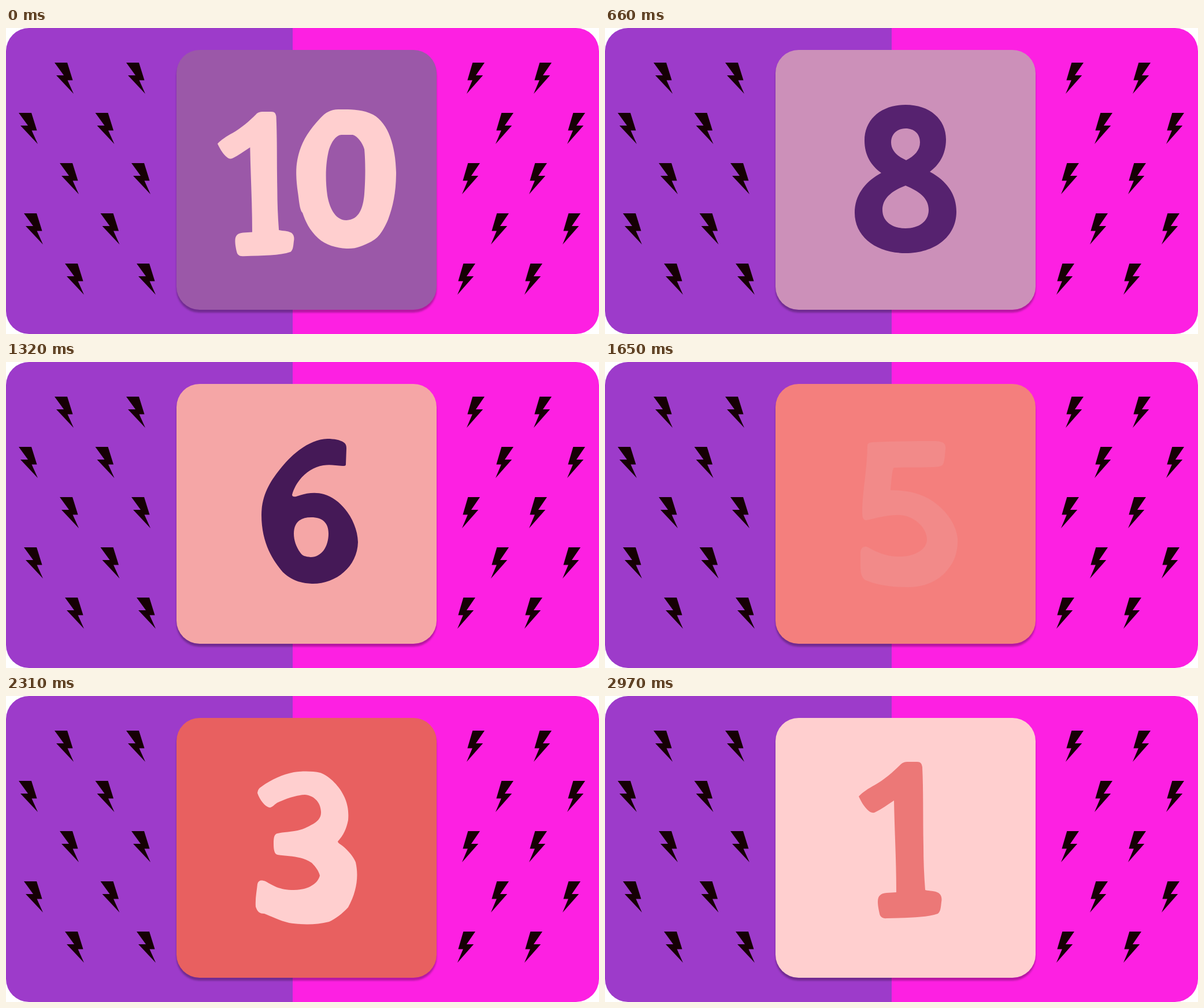
Write an HTML page that moves like this. It is 1026x530 px and loops after 3300 ms.

```html
<!DOCTYPE html>
<html lang="en">
<head>
<meta charset="utf-8">
<title>Countdown</title>
<style>
  html, body { margin: 0; width: 100%; height: 100%; overflow: hidden; background: #fff; }
  svg { display: block; width: 1026px; height: 530px; }
  #card { filter: drop-shadow(0 5px 1.5px rgba(0, 0, 0, .28)); }
  #digits > g { display: none; fill-rule: evenodd; }
  #digits > g.on { display: inline; }
</style>
</head>
<body>
<svg viewBox="0 0 1026 530">
  <defs>
    <clipPath id="stage"><rect width="1026" height="530" rx="40"/></clipPath>
    <path id="bolt" d="M0 0H22L31.5 30.5H22.5L33 54L3 22H16Z"/>
    <path id="one" d="M439 174C445 167 456 160 467 154C483 145 499 131 511 119C515 115 519 114 524 114L540 114C546 114 548 117 549 123C551 165 550 215 551 260C551 285 552 310 554 336C562 338 570 337 577 341C583 345 583 352 582 357C581 365 581 373 576 377C555 384 525 384 488 385C480 386 476 382 475 377C473 368 472 362 472 356C472 346 477 342 487 341L504 340C504 285 501 235 500 181C488 189 478 196 468 201C463 204 458 201 454 197C447 190 443 182 439 174Z"/>
  </defs>
  <g clip-path="url(#stage)">
    <path fill="#9d3bca" d="M0 0H496V530H0Z"/>
    <path fill="#fd20e2" d="M496 0H1026V530H496Z"/>
  </g>
  <g id="bolts" fill="#160004"></g>
  <rect id="card" x="295" y="38" width="450" height="450" rx="40"/>
  <g id="digits">
    <g data-card="#9b58a8" fill="#ffcfcf">
      <use href="#one" transform="translate(-39.2 39.8) scale(.923)"/>
      <path d="M543 157C553 146 562 141 575 141C595 141 615 140 635 150C662 165 674 205 675 250C675 283 670 308 661 332C651 355 643 364 632 370C617 377 606 383 589 382C572 381 553 376 540 364C525 350 518 335 513 320C508 316 507 298 505 285C502 265 501 245 504 229C509 202 520 182 543 157ZM580 185L600 185C608 187 617 199 620 210C622 230 622 262 620 287C618 312 611 332 589 333C568 333 559 308 556 290C552 262 553 232 559 210C563 198 570 186 580 185Z"/>
    </g>
    <g data-card="#56226f" fill="#cc90b9">
      <path d="M521 133C545 133 573 148 589 172C602 194 609 225 609 271C608 305 598 338 575 361C562 373 548 378 537 384C525 389 500 389 486 390C468 389 456 388 451 381C446 372 446 358 445 349C445 341 452 338 458 338C470 341 480 347 498 346C520 346 542 323 555 299C554 297 545 303 535 307C524 312 513 311 500 309C475 305 450 293 438 273C430 260 427 243 428 229C429 175 475 134 521 133ZM516 188C538 188 549 210 548 230C547 243 542 250 531 255C520 261 510 263 500 261C486 257 481 246 481 233C482 210 498 189 516 188Z"/>
    </g>
    <g data-card="#cc90b9" fill="#56226f">
      <path d="M520 133C562 133 590 158 590 193C590 220 577 238 562 249C588 263 608 285 608 318C608 362 570 390 520 390C470 390 432 362 432 320C432 288 452 265 478 251C460 238 449 220 449 195C449 158 478 133 520 133ZM520 174C505 174 495 184 495 198C495 214 508 223 521 229C535 222 545 212 545 198C545 183 535 174 520 174ZM520 273C498 281 480 294 480 315C480 335 497 347 520 347C543 347 560 335 560 315C560 294 542 282 520 273Z"/>
    </g>
    <g data-card="#e86060" fill="#cc90b9">
      <path d="M442 165C442 150 445 146 452 145C475 141 545 145 600 146C608 147 610 147 611 152C612 170 611 180 606 192C590 231 566 278 546 325C540 333 542 342 537 351C531 366 527 377 521 385C518 390 508 390 499 389C485 386 478 380 480 371C481 362 487 356 489 346C509 300 532 247 553 194C515 192 480 191 448 188C443 187 442 187 442 183Z"/>
    </g>
    <g data-card="#f5a6a6" fill="#451957">
      <path d="M589 150L588 177C588 180 586 180 582 180C570 179 560 177 549 179C523 183 502 205 495 230C495 234 500 234 505 232C520 227 535 225 550 229C580 237 608 275 609 312C608 355 570 385 529 384C509 383 494 378 479 364C463 345 442 315 442 265C442 230 458 205 477 182C500 154 528 134 556 133C568 133 578 135 584 139C589 142 589 147 589 150ZM528 269C548 269 558 279 558 297C558 320 546 338 527 338C518 337 513 336 509 330C502 320 498 309 498 297C498 279 508 269 528 269Z"/>
    </g>
    <g data-card="#f47f7d" fill="#f28a89">
      <path d="M454 146C454 141 456 140 462 139C500 137 540 137 573 137C587 138 590 142 589 152C588 160 588 170 585 177C583 181 575 182 565 182C545 183 520 182 500 183C497 185 496 200 494 222C520 222 545 226 567 241C590 257 607 280 610 305C611 325 606 344 594 358C581 376 557 390 525 390C498 390 470 387 449 377C442 370 442 360 442 350L442 329C443 321 449 318 455 321C470 329 485 337 510 337C535 337 558 325 557 306C556 285 533 266 510 265C490 264 470 270 452 274C446 274 445 268 445 258C446 220 453 190 454 146Z"/>
    </g>
    <g data-card="#9b58a8" fill="#ffcfcf">
      <path d="M545 135L568 135C578 136 580 140 580 148L580 290C592 290 603 289 608 293C612 300 611 318 608 328C604 334 592 333 580 333L580 376C579 386 574 388 564 389L545 389C535 388 533 384 533 376L533 334L442 334C432 333 429 329 429 320C429 309 429 303 434 294C465 240 495 190 527 144C532 137 537 135 545 135ZM533 208L483 291L533 291Z"/>
    </g>
    <g data-card="#e86060" fill="#ffcfcf">
      <path d="M435 168C436 163 437 160 442 157C460 144 478 136 498 132C513 130 530 130 544 133C560 139 578 157 586 176C592 190 593 202 592 215C589 230 584 241 574 252C575 256 580 257 584 261C593 269 601 278 605 288C610 310 608 337 592 366C582 377 570 386 559 391C535 397 510 396 490 393C473 389 458 381 447 377C439 377 435 374 432 365C431 350 434 337 435 326C437 318 443 319 449 321C462 328 472 336 498 336C520 336 539 327 543 311C541 303 536 296 529 289C512 277 490 278 470 275C464 274 463 265 463 256C463 245 464 239 470 238C480 235 500 236 517 229C532 222 546 216 545 200C544 182 531 172 517 171C498 172 480 180 469 185C463 189 460 194 455 193C448 191 439 180 435 168Z"/>
    </g>
    <g data-card="#f47f7d" fill="#56226f">
      <path d="M438 172C455 145 485 132 520 132C565 132 596 160 596 200C596 250 550 300 506 342L595 340C606 340 609 346 609 355L608 375C607 385 602 388 592 388L450 389C438 389 434 384 434 374C434 362 436 352 445 343C490 300 545 245 545 205C545 185 535 175 517 175C495 175 482 185 471 197C466 203 461 203 455 198C446 190 440 182 438 172Z"/>
    </g>
    <g data-card="#ffcfcf" fill="#ec7877"><use href="#one"/></g>
  </g>
</svg>
<script>
  const STEP = 330;
  const card = document.getElementById('card');
  const digits = [...document.getElementById('digits').children];

  const bolt = (x, y, scale) =>
    `<use href="#bolt" transform="translate(${x} ${y}) scale(${scale} 1)"/>`;

  // Five staggered rows of bolts, mirrored on the right half
  let bolts = '';
  for (let row = 0; row < 5; row++) {
    const y = 60 + 87 * row, odd = row % 2, pair = row >> 1;
    const left = (odd ? 22 : 84) + 9 * pair;
    const right = (odd ? 878 : 828) - 8 * pair;
    bolts += bolt(left, y, 1) + bolt(left + (odd ? 132.5 : 124), y, 1)
      + bolt(right, y, -.94) + bolt(right + (odd ? 124 : 116), y, -.94);
  }
  document.getElementById('bolts').innerHTML = bolts;

  const start = performance.now();
  function draw() {
    const elapsed = performance.now() - start;
    const current = Math.floor(elapsed / STEP) % digits.length;
    digits.forEach((digit, i) => digit.classList.toggle('on', i === current));
    card.setAttribute('fill', digits[current].dataset.card);
    requestAnimationFrame(draw);
  }
  draw();
</script>
</body>
</html>
```
